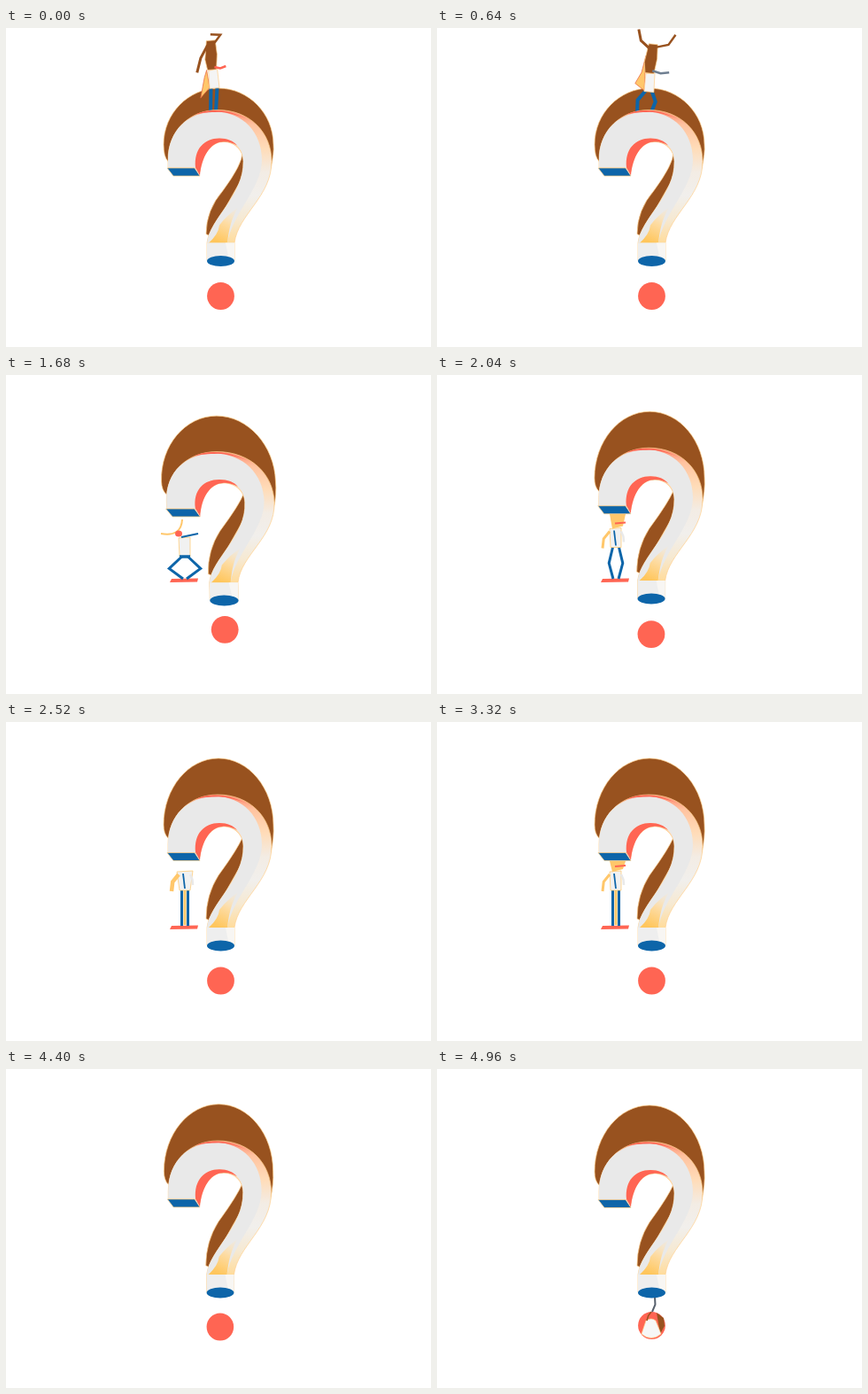
These frames come from a looping animation (480 px wide and 360 px high, 5 s). An HTML page with a canvas:

```html
<!DOCTYPE html>
<html lang="en">
<head>
<meta charset="utf-8">
<title>Question mark</title>
<style>
html, body { margin: 0; width: 100%; height: 100%; overflow: hidden; background: #fff }
canvas { display: block }
</style>
</head>
<body>
<canvas id="stage" width="480" height="360"></canvas>
<script>
const ctx = document.getElementById('stage').getContext('2d');
const LOOP = 5000, STEP = 40;
const BLUE = '#0d65a9', RED = '#ff6553', BROWN = '#98521f', GREY = '#e9e9e9', GOLD = '#ffc76b', RIM = '#ffcf8c';

const lerp = (a, b, p) => a + (b - a) * p;
const ramp = (t, from, to) => {
  const p = Math.min(1, Math.max(0, (t - from) / (to - from)));
  return p * p * (3 - 2 * p);
};

function shape(d, fill, rim, width = 0.7) {
  const path = new Path2D(d);
  if (fill) { ctx.fillStyle = fill; ctx.fill(path); }
  if (rim) { ctx.strokeStyle = rim; ctx.lineWidth = width; ctx.stroke(path); }
}
const poly = (points, fill, rim) => shape(`M${points}Z`, fill, rim);
const line = (points, color, width) => shape(`M${points}`, null, color, width);
function oval(x, y, rx, ry, fill) {
  ctx.beginPath();
  ctx.ellipse(x, y, rx, ry, 0, 0, 2 * Math.PI);
  ctx.fillStyle = fill;
  ctx.fill();
}
// Two bones from (ax, ay) to (bx, by), the joint pushed sideways by bend
function limb(ax, ay, bx, by, bend, color, width) {
  const dx = bx - ax, dy = by - ay, k = bend / Math.hypot(dx, dy);
  line([ax, ay, ax + dx / 2 - dy * k, ay + dy / 2 + dx * k, bx, by], color, width);
}
function legs(hipX, hipY, footX, spread, bend, width) {
  for (const side of [-1, 1])
    limb(hipX + 3.5 * side, hipY, footX + spread * side, 230, -bend * side, BLUE, width);
}
function clipped(top, height, draw) {
  ctx.save();
  ctx.beginPath();
  ctx.rect(0, top, 480, height);
  ctx.clip();
  draw();
  ctx.restore();
}
function gradient(x0, y0, x1, y1, ...colors) {
  const g = ctx.createLinearGradient(x0, y0, x1, y1);
  colors.forEach((color, i) => g.addColorStop(i / (colors.length - 1), color));
  return g;
}
const sideFill = gradient(0, 72, 0, 232, RED, '#ffc3a0', '#ffdcb8', '#f3ece4', '#f1efec', '#f6e9d2', '#ffdc9c');
const goldFill = gradient(262, 190, 242, 232, '#ffe9c800', '#fddca4', '#ffc65c');

function markAt(t) {
  const depth = ramp(t, 1120, 1640);
  const wobble = -Math.sin((t - 1180) / 102) * Math.exp((1660 - t) / 460) * ramp(t, 1120, 1300) * (1 - ramp(t, 1680, 2240));
  const swell = ramp(t, 1040, 1200) * (1 - ramp(t, 1660, 2100));
  const pull = ramp(t, 3840, 3960) * (1 - ramp(t, 4080, 4480));
  const drop = 10.5 * (1 - depth) + 2 * swell;
  return {
    depth, drop, pull,
    sx: 1 + 0.04 * swell - 0.06 * pull,
    sy: 1 - 0.015 * swell + 0.057 * pull,
    skew: 0.03 * wobble * depth - 0.033 * pull,
    dotX: 242.5 + 5 * wobble * depth - 6 * pull,
    dotY: 292 + 10.5 * (1 - depth) - 5 * wobble + 2 * pull - 2.5 * ramp(t, 4100, 4700)
  };
}

function drawBack(depth) {
  const y = (a, b) => lerp(a, b, depth);
  const top = y(57.5, 41), wide = y(121, 116), corner = y(140, 131), shoulder = lerp(top, wide, 0.45);
  shape(`M183 ${corner}Q178 ${corner - 5} 178 ${wide}C178 ${shoulder} 206 ${top} 240 ${top}
    S302 ${shoulder} 302 ${wide}Q303 130 299 148Z`, BROWN, RIM);
  shape('M213 153C213 112 268 106 268 140C267 168 228 200 226 232L200 200Z', '#fff');
  const slim = 5 * (1 - depth);
  shape(`M267 130Q${262 + slim} 143 ${240 + slim} 173Q226 195 226 222L230 224L266 160L272 140Z`, BROWN, RIM);
}

function drawFront() {
  shape(`M183 147V138C183 105 208 82 239 82C276 82 300 108 300 140C300 180 262 200 258 232V252
    H227V232C230 205 269 178 268 140C268 127 257 117 244 118C231 119 221 134 219 152L213 147Z`, sideFill, RIM);
  shape(`M183 147V138C183 105 206 84 236 84C268 84 289 108 289 138C289 170 256 198 250 232
    H227C230 205 269 178 268 140C268 133 266 127 261 122C257 117 250 114 241 114C224 114 212 126 214 147Z`, GREY);
  shape('M214 87Q239 76 272 92Q250 83 236 84.5Q224 84 214 87Z', RED);
  shape('M214 147C212 126 224 114 241 114C250 114 257 117 261 122C256 119 249 117 244 118C231 119 221 134 219 156Z', RED);
  shape('M262 192C254 206 252 216 250 232H229Q240 222 241 212C247 204 254 198 262 192Z', goldFill);
  shape('M227 232H258V252H227Z', '#eee');
  shape('M248 232H258V252H252Z', '#f8f6f3');
  oval(242.5, 252.5, 15.5, 6, BLUE);
  shape('M182 147.5H213L219 156.5H189Z', BLUE, RIM);
}

// Looks out from the top, waves, then hops down into the mark
function drawClimber(t) {
  const p = ramp(t, 160, 600), fall = Math.max(0, t - 760);
  const sway = p * Math.sin((t - 640) / 70) * 2;
  const waistX = lerp(235, 239, p), waistY = lerp(67, 71, p);
  clipped(0, 96, () => {
    ctx.translate(0, 0.0013 * fall * fall - 0.2 * fall);
    ctx.save();
    ctx.translate(0, -135);
    legs(waistX, waistY + 135, 234, lerp(3, 8, p), 4.5 * p, 4);
    ctx.restore();
    ctx.translate(waistX, waistY);
    ctx.rotate(lerp(-0.07, 0.1, p));
    poly([-7, -20 - 19 * p, -10, -12 - 8 * p, -16, 11 - 18 * p, -5, 0], GOLD, '#e8663f');
    poly([-5, -19, 5, -21, 6, 1, -5, 1], '#f4f4f4', RIM);
    poly([-5, -53, 5, -53, 6, -37, 4, -20, -6, -20, -8, -32], BROWN, RIM);
    limb(-4, -48, -18 + sway, lerp(-18, -68, p), lerp(2, -4, p), BROWN, 3);
    limb(4, -50, lerp(0, 24, p) + sway, lerp(-60, -66, p), lerp(10, 5, p), BROWN, 2.5);
    limb(2, -23, 15 + 6 * p, -23, 2, p > 0.5 ? '#6f7f91' : RED, 2.5);
  });
}

// Drops from the open end, straightens up, then climbs back inside
function drawWalker(t) {
  const p = ramp(t, 1760, 2200), leaving = ramp(t, 3480, 3960);
  const bowed = t >= 2200 && t < 2920;
  const waist = lerp(205, 190, p), neck = waist - 21;
  const half = lerp(16, 7, leaving) * ramp(t, 1400, 1600);
  poly([201 - half, 234, 203 - half, 230, 201 + half, 229.5, 200 + half, 233.5], RED);
  if (t > 3700) limb(201, 168, 197, 218, -1, '#a0713f', 1.7);

  clipped(t > 3800 ? 150 : 157, 80, () => {
    ctx.translate(202, -75 * (1 - ramp(t, 1400, 1640)) - 62 * leaving - 28 * ramp(t, 3960, 4080));
    ctx.scale(1 - leaving * 0.3, 1);
    ctx.translate(leaving * -3, 0);
    if (p > 0.9) line([0, 190, 0, 229], GOLD, 3);
    legs(0, waist, 0, lerp(2, 3.5, p), 15 * (1 - p), 3);
    poly([bowed ? -9 : -7, neck, bowed ? 9 : 6, neck - 1, 6, waist, -6, waist], '#f1f1f1', GOLD);
    if (p < 0.5) {
      shape(`M-27 ${neck - 5}Q-4 ${neck - 1} -3 ${neck - 21}`, null, GOLD, 2);
      line([-4, neck - 1, 15, neck - 5], BLUE, 2.2);
      line([-6, waist, 6, waist], BLUE, 3.5);
      oval(-7, neck - 5, 4, 3.5, RED);
    } else {
      limb(-7, neck + 3, -15, neck + 22, 3, GOLD, bowed ? 4.5 : 3);
      limb(6, neck + 3, 9, neck + 15, -1, GREY, 2.5);
      line([-2, neck + 2, 0, neck + 19], BLUE, 1.8);
      if (!bowed) {
        poly([-7, 157, 11, 157, 8, neck - 3, -4, neck], GOLD);
        line([-1, neck - 6, 11, neck - 7], RED, 2);
      }
    }
  });
}

function drawDot(x, y, pull) {
  oval(x, y, 15.4 - pull, 15.4 + pull, RED);
}

// Slides out of the stem and settles on the dot
function drawSlider(t) {
  clipped(258, 47, () => {
    ctx.translate(0, -45 * (1 - ramp(t, 4560, 4880)));
    limb(246, 257, 243, 274, -2, '#56606c', 2);
    poly([248, 275, 256, 281, 257, 290, 252, 299], BROWN);
    shape('M231 299L236 284Q242 280 247 284L253 299Q242 308 231 299Z', '#f7f7f7', RIM);
    limb(242, 274, 237, 284, 1, BROWN, 1.5);
  });
}

function frame() {
  const t = Math.floor(performance.now() % LOOP / STEP) * STEP;
  const { depth, drop, pull, sx, sy, skew, dotX, dotY } = markAt(t);
  const plain = () => ctx.setTransform(1, 0, 0, 1, 0, 0);
  const bent = () => ctx.setTransform(sx, 0, skew, sy, 241 * (1 - sx) - 115 * skew, 252 * (1 - sy) + drop);
  plain();
  ctx.clearRect(0, 0, 480, 360);
  bent();
  drawBack(depth);
  plain();
  if (t < 1120) drawClimber(t);
  bent();
  drawFront();
  if (t >= 3880 && t < 4120) shape('M231 231Q234 226 236 225Q235 214 243 215Q249 218 245 231Z', '#fff', RIM);
  plain();
  drawDot(dotX, dotY, pull);
  if (t >= 1400 && t < 4080) drawWalker(t);
  if (t >= 4560) drawSlider(t);
  requestAnimationFrame(frame);
}
frame();
</script>
</body>
</html>
```
